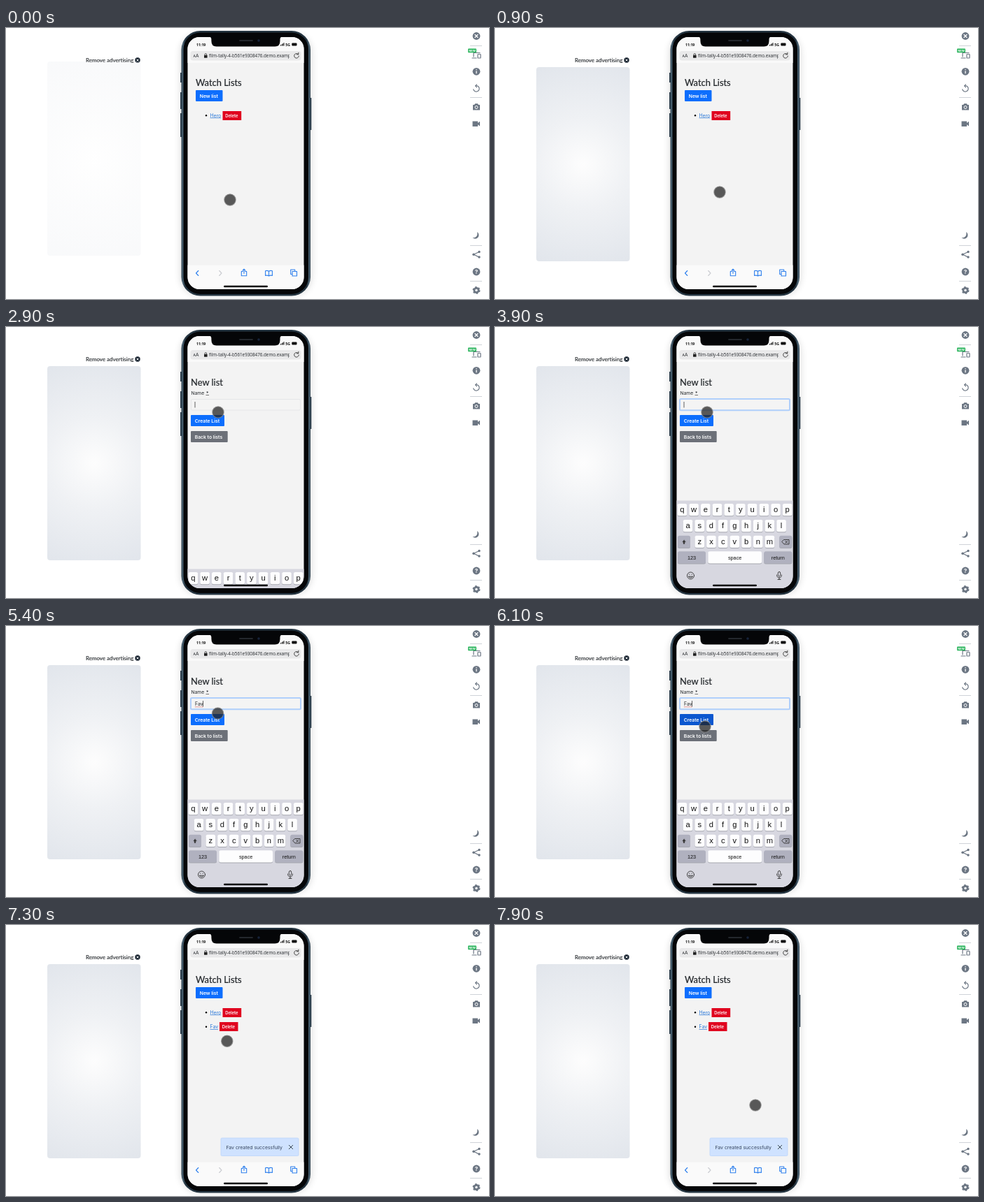
Animation, 690 px wide and 388 px high, one loop 8 s. Source, as an HTML page:

```html
<!DOCTYPE html>
<html lang="en">
<head>
<meta charset="utf-8">
<title>List app on a phone</title>
<style>
  html, body { margin: 0; width: 100%; height: 100%; overflow: hidden; background: #fff; }
  svg { display: block; width: 690px; height: 388px; }
  text { font-family: Inter, sans-serif; font-size: 6.9px; fill: #212529; }
  .title { font-family: Lato, sans-serif; font-size: 12.9px; stroke: #212529; stroke-width: .2; }
  .btn { fill: #fff; font-weight: 600; font-size: 6.8px; }
  .small { font-size: 5.9px; }
  .link { fill: #2a78d8; text-decoration: underline; }
  .status { font-family: "Open Sans", sans-serif; font-size: 5.2px; font-weight: 700; fill: #111; }
  .url { font-family: "Open Sans", sans-serif; font-size: 6.3px; font-weight: 500; }
  .key { font-family: "Liberation Sans", Arial, sans-serif; font-size: 11.2px; text-anchor: middle; fill: #111; }
  .word { font-size: 7.3px; }
  .line { fill: none; stroke-linecap: round; stroke-linejoin: round; }
</style>
</head>
<body>
<svg viewBox="0 0 690 388">
  <defs>
    <radialGradient id="glow" gradientUnits="userSpaceOnUse" cx="126" cy="195" r="150">
      <stop offset="0" stop-color="#fdfdfd"/>
      <stop offset=".45" stop-color="#eff1f4"/>
      <stop offset="1" stop-color="#e2e6ec"/>
    </radialGradient>
    <linearGradient id="metal">
      <stop offset="0" stop-color="#2b3d4a"/>
      <stop offset=".01" stop-color="#4c6474"/>
      <stop offset=".03" stop-color="#243440"/>
      <stop offset=".97" stop-color="#243440"/>
      <stop offset=".99" stop-color="#4c6474"/>
      <stop offset="1" stop-color="#2b3d4a"/>
    </linearGradient>
    <filter id="soft" x="-20%" y="-10%" width="140%" height="120%"><feGaussianBlur stdDeviation="5"/></filter>
    <clipPath id="screen"><rect x="259.500" y="13" width="166" height="361" rx="17"/></clipPath>
    <clipPath id="urlBox"><rect x="288" y="32" width="117" height="16"/></clipPath>
  </defs>

  <!-- advert panel -->
  <text x="114" y="49" style="font:7.95px Lato,sans-serif" stroke="#212529" stroke-width=".12">Remove advertising</text>
  <circle cx="188" cy="46" r="3.7" fill="#1c2733"/>
  <path d="M186.6 44.6l2.8 2.8m0-2.8l-2.8 2.8" stroke="#fff"/>
  <rect id="advert" x="59" y="56" width="133.5" height="278" rx="4" fill="url(#glow)"/>

  <!-- sidebar -->
  <g fill="#6c7683">
    <path d="M663 25.500h17M663 99.500h17M663 311.500h17M663 362.500h17" stroke="#cfd3d8"/>
    <circle cx="672" cy="11.500" r="5.400"/>
    <circle cx="672" cy="62.300" r="5.400"/>
    <circle cx="672" cy="349" r="5.400"/>
    <path class="line" d="M670 9.500l4 4m0-4l-4 4M672 61.800v3M672 59.500v.2" stroke="#fff" stroke-width="1.300"/>
    <text x="672" y="352" text-anchor="middle" style="font-size:8px;font-weight:700;fill:#fff">?</text>
    <g class="line" stroke="#6c7683" stroke-width="1.200">
      <path d="M668 41v-5.500h9M666 43h6"/>
      <rect x="674" y="37.500" width="4" height="5.500" rx=".6"/>
      <path d="M671 82.800a4.200 4.200 0 1 1-3.200 5M672.500 80.800l-2 2 2 2"/>
      <path d="M676 320.500l-8 3.800 8 3.800"/>
    </g>
    <rect x="660" y="29.500" width="12" height="5.700" rx="1" fill="#27b35a"/>
    <text x="666" y="34" text-anchor="middle" style="font-size:4px;font-weight:700;fill:#fff">NEW</text>
    <path d="M667 110h2l1.200-1.800h3.600L675 110h2v7.500h-10z"/>
    <circle cx="672" cy="113.500" r="2" fill="#6c7683" stroke="#fff"/>
    <path d="M666.500 133.500h7.500v2.500l3-2.200v6.700l-3-2.200v2.700h-7.500z"/>
    <path d="M673 292a5.200 5.200 0 1 1-6.500 8c5 1 8-3 6.500-8z"/>
    <circle cx="676" cy="320.500" r="1.700"/><circle cx="668" cy="324.300" r="1.700"/><circle cx="676" cy="328" r="1.700"/>
    <circle cx="672" cy="375.500" r="4.500" stroke="#6c7683" stroke-width="2" stroke-dasharray="2.300 2.412"/>
    <circle cx="672" cy="375.500" r="1.700" fill="#fff"/>
  </g>

  <!-- phone body -->
  <rect x="248" y="7" width="190" height="377" rx="28" fill="#000" opacity=".1" filter="url(#soft)"/>
  <path d="M250 64v14M250 92v24M250 122v34M435.300 100v46" stroke="#2c3e4c" stroke-width="2"/>
  <rect x="250.500" y="4" width="184.500" height="379.500" rx="27" fill="url(#metal)"/>
  <rect x="253.500" y="6.500" width="178.500" height="374.500" rx="24" fill="#050608"/>

  <g clip-path="url(#screen)">
    <rect x="259" y="13" width="167" height="362" fill="#f3f3f3"/>
    <rect x="259" y="13" width="167" height="37" fill="#f9f9f9"/>
    <text class="status" x="272" y="25.500">11:19</text>
    <path d="M392.500 25.500v-1.300m1.500 1.300v-2.200m1.500 2.200v-3.200m1.500 3.200v-4.300" stroke="#111"/>
    <text class="status" x="399.300" y="25.500">5G</text>
    <rect x="408.300" y="21.500" width="7.200" height="4" rx="1" fill="#111"/>
    <rect x="263.500" y="33" width="158" height="13.500" rx="3.500" fill="#e9e9ea"/>
    <text x="267.500" y="42" style="font-size:5px">A<tspan style="font-size:6.500px">A</tspan></text>
    <rect x="283" y="39" width="4.600" height="3.800" rx=".6" fill="#222"/>
    <path class="line" d="M284 39v-1a1.300 1.300 0 0 1 2.600 0v1" stroke="#222" stroke-width=".8"/>
    <text class="url" x="290" y="42.200" clip-path="url(#urlBox)">film-tally-4-b561e9308476.demo.example</text>
    <path class="line" d="M417.600 37.800a3.300 3.300 0 1 0 .7 2.300M415.300 37.800h2.500v-2.500" stroke="#333" stroke-width=".9"/>

    <g id="lists">
      <text class="title" x="271" y="83">Watch Lists</text>
      <rect id="newButton" x="271" y="89" width="38.500" height="16" rx="1"/>
      <text class="btn" x="276.800" y="99.600">New list</text>
      <circle cx="286" cy="125.300" r="1.200"/>
      <text class="link" x="291.500" y="127.500">Hero</text>
      <rect x="309.500" y="119" width="26.700" height="13" fill="#e0051f"/>
      <text class="btn small" x="313.300" y="127.800">Delete</text>
      <g id="added">
        <circle cx="286" cy="145.800" r="1.200"/>
        <text class="link" x="291.500" y="148">Fav</text>
        <rect x="305" y="139" width="26.500" height="13" fill="#e0051f"/>
        <text class="btn small" x="308.700" y="148">Delete</text>
      </g>
    </g>

    <g id="form">
      <text class="title" x="264" y="83.700">New list</text>
      <text x="264.500" y="97.300" style="font-size:6.700px">Name</text>
      <text x="286" y="98.300" fill="#944">*</text>
      <path d="M285.500 97.500h4.500" stroke="#555" stroke-width=".8"/>
      <rect x="264.500" y="103.500" width="156" height="15.500" rx="1.500" fill="#f4f4f4" stroke="#e5e6e8"/>
      <rect id="ring" x="264" y="103" width="157" height="16.300" rx="1.500" fill="none" stroke="#b0cffb" stroke-width="2"/>
      <text id="typed" x="270" y="114"></text>
      <path id="spelling" stroke="#d65a5a" stroke-width=".9" stroke-dasharray="1.300 .7"/>
      <path id="caret" stroke="#222" stroke-width=".7"/>
      <rect id="createButton" x="264" y="126" width="48" height="16" rx="1"/>
      <text class="btn" x="269.700" y="136.600">Create List</text>
      <rect x="264" y="149" width="52.700" height="16" rx="1" fill="#6c7078"/>
      <text class="btn" x="269.700" y="159.600">Back to lists</text>
    </g>

    <g id="toast">
      <rect x="307" y="305" width="111" height="25.500" rx="1.500" fill="#cfe2ff" stroke="#bcd5fa" stroke-width=".8"/>
      <text x="314.500" y="320.500" style="font-size:6.850px;fill:#34445c">Fav created successfully</text>
      <path d="M404 315l6 6m0-6l-6 6" stroke="#3a4758"/>
    </g>

    <g id="toolbar" class="line" stroke="#2f80ed" stroke-width="1.100">
      <path d="M259 339.500h167V375H259z" fill="#fafafa" stroke="none"/>
      <path d="M274.800 347.500l-3.300 3.500 3.300 3.500"/>
      <path d="M304.700 347.500l3.300 3.500-3.300 3.500" stroke="#c9cbd0"/>
      <path d="M338.300 348.500h-2v6.300h7.400v-6.300h-2M340 351.500v-6.300m-2 2l2-2 2 2"/>
      <path d="M375.500 348.300q-2.500-1.500-4.900-.5v6.700q2.400-1 4.900.4 2.500-1.400 4.900-.4v-6.700q-2.400-1-4.900.5zv6.400"/>
      <path d="M406.700 346h6v2M406.700 346v6.500h2M409 348.500h6.500v6.500H409z"/>
    </g>
    <g id="keyboard"></g>
    <rect x="311" y="368.700" width="63" height="2.500" rx="1.250" fill="#0a0a0a"/>
  </g>

  <path d="M289.800 12.500q3.600 0 3.600 4v2q0 8 7.200 8h83.700q7.200 0 7.200-8v-2q0-4 3.600-4z" fill="#050608"/>
  <path class="line" d="M334 18h18" stroke="#24282d" stroke-width="1.800"/>
  <circle cx="361" cy="18" r="1.800" fill="#17233a"/>

  <circle id="touch" r="8.200" fill="#222" fill-opacity=".74" stroke="#888" stroke-opacity=".7" stroke-width="1.200"/>
  <path id="arrow" d="M0 0v8.500l2-1.800 1.500 3.200 1.600-.7-1.500-3.200h2.700z" fill="#fff" stroke="#222" stroke-width=".8"/>
</svg>

<script>
const LOOP = 8000, STEP = 100;
const $ = id => document.getElementById(id);
const set = (id, attrs) => { for (const name in attrs) $(id).setAttribute(name, attrs[name]); };
const show = (id, on) => $(id).style.display = on ? "" : "none";
const progress = (t, from, to) => Math.min(1, Math.max(0, (t - from) / (to - from)));

function buildKeyboard() {
  const key = (x, y, w, label, { fill = "#fdfdfe", cls = "key", drop = 11.8 } = {}) =>
    `<rect x="${x}" y="${y + 1}" width="${w}" height="17.300" rx="2.500" fill="#a6a8b0"/>` +
    `<rect x="${x}" y="${y}" width="${w}" height="17.300" rx="2.500" fill="${fill}"/>` +
    `<text class="${cls}" x="${x + w / 2}" y="${y + drop}">${label}</text>`;
  const grey = { fill: "#b0b1bf", cls: "key word", drop: 11.3 };
  const row = (letters, x, y) => [...letters].map((c, i) => key(x + i * 16.7, y, 13.6, c)).join("");
  $("keyboard").innerHTML =
    `<rect x="259" y="248.500" width="167" height="230" fill="#d7d7e0"/>` +
    row("qwertyuiop", 260.6, 253) + row("asdfghjkl", 268.7, 276) + row("zxcvbnm", 285.5, 298.8) +
    key(261, 298.8, 18, "", grey) + key(406.3, 298.8, 18, "", grey) +
    key(261, 321.3, 40, "123", grey) + key(304.3, 321.3, 76.7, "space", { ...grey, fill: "#fdfdfe" }) +
    key(384.3, 321.3, 40, "return", grey) +
    `<g class="line" stroke="#333" stroke-width=".9">
      <path d="M270 305l-2.200 2.800h1.300v2.700h1.800v-2.700h1.300z" fill="#333" stroke-width=".4"/>
      <path d="M413 304.500h7v6.500h-7l-3-3.250zM414.800 306.300l3 3m0-3l-3 3"/>
      <circle cx="279.500" cy="356" r="5"/>
      <path d="M276.500 357.500q3 3.500 6 0zM277.800 354v.4M281.200 354v.4"/>
      <rect x="404.300" y="350.500" width="3.400" height="6.500" rx="1.700"/>
      <path d="M402.500 355q0 4 3.500 4t3.500-4M406 359v2.500m-2 0h4"/>
    </g>`;
}

// time, x, y of the touch point
const touchPath = [
  [0, 320, 246], [700, 320, 246], [900, 321, 235], [1500, 298, 111], [2099, 298, 111],
  [2100, 305, 151], [2200, 303, 122], [5300, 303, 122], [6000, 300, 144],
  [7200, 300, 144], [7700, 379, 255], [7800, 379, 255], [7900, 372, 258], [LOOP, 372, 258]
];
function touchAt(t) {
  const i = touchPath.findIndex(p => p[0] > t);
  const [t0, x0, y0] = touchPath[i - 1], [t1, x1, y1] = touchPath[i];
  const k = (t - t0) / (t1 - t0);
  return [x0 + (x1 - x0) * k, y0 + (y1 - y0) * k];
}

const keystrokes = [4400, 4700, 5000];
const caretOffsets = [0, 5, 8.5, 11.5];

function drawForm(t) {
  const count = keystrokes.filter(at => at <= t).length;
  const focused = t >= 2900 && t < 6400;
  const lastEvent = count ? keystrokes[count - 1] : 2900;
  const blinkOn = Math.floor((t - lastEvent) / 500) % 2 === 0;
  const end = 270 + caretOffsets[count];
  $("typed").textContent = "Fav".slice(0, count);
  set("spelling", { d: `M270 115.800H${end}` });
  set("caret", { d: `M${end} 107v8.500` });
  show("spelling", focused && count);
  show("caret", focused && blinkOn);
  set("ring", { opacity: focused ? progress(t, 2900, 3100) : 0 });
  set("createButton", { fill: t >= 5700 && t < 6400 ? "#0b57cf" : "#0d6efd" });
}

function draw(t) {
  const arrival = progress(t, 0, 300);
  set("advert", { opacity: .22 + .78 * arrival, transform: `translate(0 ${-8 * (1 - arrival)})` });

  const onForm = t >= 1700 && t < 6800;
  show("form", onForm);
  show("lists", !onForm);
  show("added", t >= 6800);
  set("newButton", { fill: t >= 1500 && t < 1700 ? "#0b57cf" : "#0d6efd" });
  drawForm(t);
  set("toast", { opacity: progress(t, 6700, 7000) });
  show("toast", t >= 6800);

  const keyboardUp = t >= 2900 && t < 6500;
  const hidden = t < 6200 ? (1 - progress(t, 2900, 3100)) ** 1.3 : progress(t, 6200, 6500);
  show("keyboard", keyboardUp);
  show("toolbar", !keyboardUp);
  set("keyboard", { transform: `translate(0 ${98 * hidden})` });

  const firstClick = t >= 1600 && t < 2100, secondClick = t >= 6400 && t < 7300;
  const [x, y] = touchAt(t);
  set("touch", { cx: x, cy: y });
  set("arrow", { transform: firstClick ? "translate(296 103.500)" : "translate(291.500 135.500)" });
  show("arrow", firstClick || secondClick);
  show("touch", !firstClick && !secondClick);
}

buildKeyboard();
const start = performance.now();
function tick() {
  const t = (performance.now() - start) % LOOP;
  draw(Math.floor(t / STEP) * STEP);
  requestAnimationFrame(tick);
}
tick();
</script>
</body>
</html>
```
